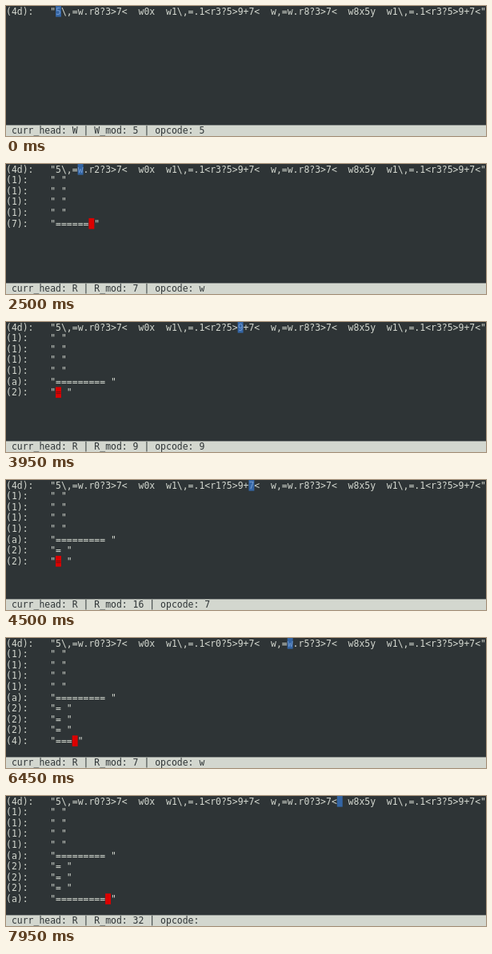
An HTML page with a canvas that plays this animation: 600 px wide and 163 px high, repeating every 8 s.

```html
<!DOCTYPE html>
<html lang="en">
<head>
<meta charset="utf-8">
<title>Two-headed tape machine</title>
<style>
html, body { margin: 0; width: 600px; height: 163px; overflow: hidden; background: #2e3436; }
canvas { display: block; }
</style>
</head>
<body>
<canvas id="stage" width="600" height="163"></canvas>
<script>
const ctx = document.getElementById('stage').getContext('2d');
const W = 600, H = 163, LOOP = 8000, TICK = 50;
const CELL = W / 87, ROW = H / 12, BASE = 10.7, LEFT = 9;
const BG = '#2e3436', FG = '#d3d7cf';
const BLUE = '#3465a4', BLUE_TEXT = '#7199cf', RED = '#dc0000', RED_TEXT = '#7c1010';
const PROGRAM = '5\\,=w.r8?3>7<  w0x  w1\\,=.1<r3?5>9+7<  ' +
  'w,=w.r8?3>7<  w8x5y  w1\\,=.1<r3?5>9+7<';

// Key press, then auto-repeat after a delay.
const PRESS = 350, REPEAT = 995, PERIOD = 40.1;

// Runs the machine and keeps a snapshot after every instruction.
function run(count) {
  const rows = [[...PROGRAM]], code = rows[0];
  const mod = { R: 0, W: 0 };
  const pen = { x: 0, y: 0 };
  const states = [];
  let ip = -1, head = 'W';

  function exec(op) {
    if (op >= '0' && op <= '9') { mod[head] = +op; return; }
    switch (op) {
      case ' ': mod[head] = 32; break;
      case 'w': head = 'W'; break;
      case 'r': head = 'R'; break;
      case ',': mod[head] = code[++ip].charCodeAt(0); break;
      case '+': mod[head] += +code[++ip]; break;
      case 'x': pen.x = mod.W; break;
      case 'y': pen.y = mod.W; break;
      case '\\':
        for (let i = 0; i < mod.W; i++) {
          pen.y++;
          rows.splice(pen.y, 0, [' ']);
        }
        break;
      case '.':
        rows[pen.y][pen.x++] = String.fromCharCode(mod.W);
        if (pen.x === rows[pen.y].length) rows[pen.y].push(' ');
        break;
      case '?':
        if (mod.R > 0) {
          code[ip - 1] = String(mod.R - 1);
          ip += 2;
        }
        break;
      case '<':
      case '>': {
        const step = op === '<' ? -mod[head] : mod[head];
        if (head === 'R') ip += step - 1;
        else pen.x += step;
      }
    }
  }

  while (states.length < count) {
    exec(code[++ip]);
    states.push({
      rows: rows.map(r => r.join('')),
      ip, x: pen.x, y: pen.y, head, mod: mod[head], op: code[ip]
    });
  }
  return states;
}

const states = run(180);

function stepAt(t) {
  if (t < PRESS) return 0;
  if (t < REPEAT) return 1;
  return 2 + Math.floor((t - REPEAT) / PERIOD);
}

function text(str, col, row, color) {
  ctx.fillStyle = color;
  [...str].forEach((ch, i) => {
    if (ch !== ' ') ctx.fillText(ch, (col + i) * CELL, row * ROW + BASE);
  });
}

function cursor(col, row, ch, fill, ink) {
  ctx.fillStyle = fill;
  ctx.fillRect((LEFT + col) * CELL, row * ROW, CELL, ROW);
  text(ch, LEFT + col, row, ink);
}

function draw(s) {
  ctx.fillStyle = BG;
  ctx.fillRect(0, 0, W, H);
  ctx.font = `${CELL / 0.602}px "DejaVu Sans Mono", monospace`;

  s.rows.forEach((r, i) => {
    const label = `(${r.length.toString(16)}):`.padEnd(LEFT - 1);
    const cut = i === 0 ? s.ip : i === s.y ? s.x : -1;
    const shown = cut < 0 ? r : r.slice(0, cut) + ' ' + r.slice(cut + 1);
    text(`${label}"${shown}"`, 0, i, FG);
  });
  if (s.y > 0) cursor(s.x, s.y, s.rows[s.y][s.x], RED, RED_TEXT);
  cursor(s.ip, 0, s.op, BLUE, BLUE_TEXT);

  ctx.fillStyle = FG;
  ctx.fillRect(0, 11 * ROW, W, ROW);
  text(`curr_head: ${s.head} | ${s.head}_mod: ${s.mod} | opcode: ${s.op}`, 1, 11, BG);
}

const start = performance.now();

function frame() {
  const t = (performance.now() - start) % LOOP;
  draw(states[stepAt(Math.floor(t / TICK) * TICK)]);
  requestAnimationFrame(frame);
}
frame();
</script>
</body>
</html>
```
